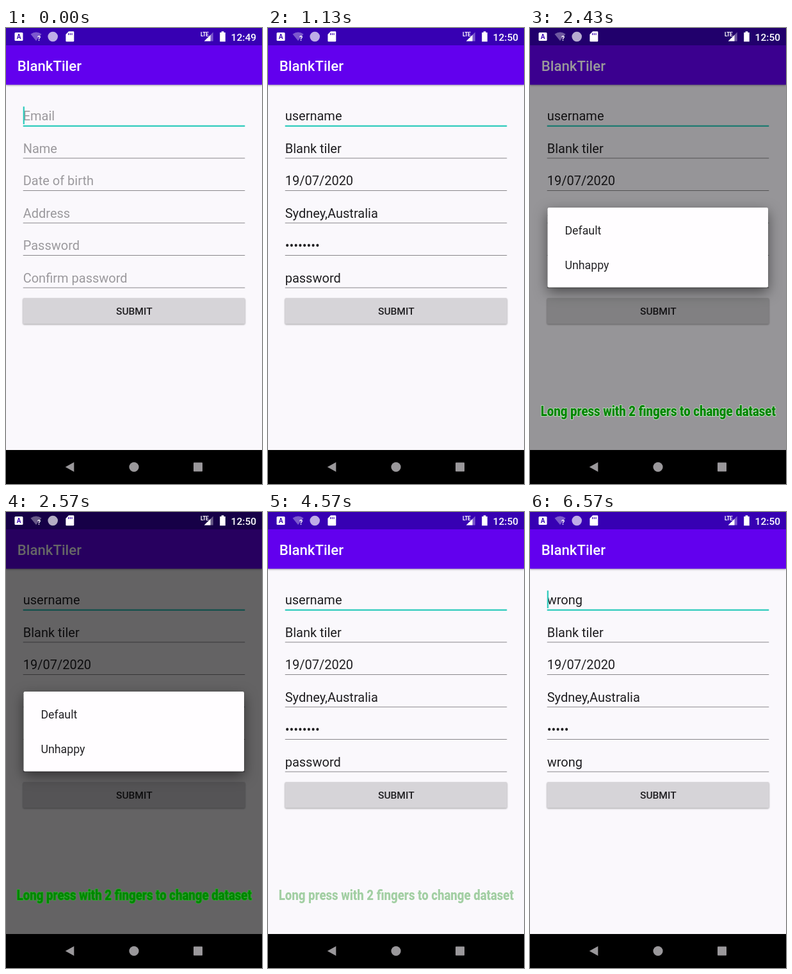
These frames come from a looping animation (400 by 711 pixels, 6.72 s). An HTML page:

```html
<!DOCTYPE html>
<html lang="en">
<head>
<meta charset="utf-8">
<title>Form demo</title>
<style>
  html, body { margin: 0; width: 100%; height: 100%; overflow: hidden; background: #000; }
  svg { display: block; width: 100vw; height: 100vh; font-family: Roboto, sans-serif; }

  .field { font-size: 20px; fill: #1f1e21; }
  .hint { fill: #9b999d; }
  .medium { font-weight: 500; }
  .item { font-size: 17.8px; fill: #242326; }
  .line { stroke: #88868a; stroke-width: 1.1; }
  .accent { fill: #2bcabb; }
  .caption {
    font-size: 22px; font-weight: 900; text-anchor: middle;
    fill: #008400; stroke: #fff; stroke-width: 1.6; paint-order: stroke;
  }

  .dialog rect { filter: drop-shadow(0 7px 10px rgba(0, 0, 0, .5)); }
  .bar { filter: drop-shadow(0 1.5px 1.5px rgba(0, 0, 0, .35)); }
  .button { filter: drop-shadow(0 1.5px 1px rgba(0, 0, 0, .35)); }

  .play { animation: 6720ms step-end infinite; }
  .empty { animation-name: empty; }
  .filled { animation-name: filled; }
  .first { animation-name: first; }
  .second { animation-name: second; }
  .cursor { animation-name: blink; }
  .dim { animation-name: dim; }
  .dialog { animation-name: dialog; }
  .caption { animation-name: caption; }

  @keyframes empty { 0% { opacity: 1 } 8.48%, 100% { opacity: 0 } }
  @keyframes filled { 0% { opacity: 0 } 8.48%, 100% { opacity: 1 } }
  @keyframes first { 0%, 72.17%, 100% { opacity: 0 } 8.48% { opacity: 1 } }
  @keyframes second { 0% { opacity: 0 } 72.17%, 100% { opacity: 1 } }
  @keyframes blink {
    0%, 4.31%, 23.36%, 29.76%, 55.2%, 63.83%, 72.17%, 89.28%, 97.76%, 100% { opacity: 1 }
    2.08%, 12.64%, 27.52%, 34.07%, 59.52%, 68%, 82.88%, 93.6% { opacity: 0 }
  }
  @keyframes dim {
    0%, 59.52%, 100% { opacity: 0 }
    36.16% { opacity: .4 }
    38.24% { opacity: .6 }
    55.2% { opacity: .02 }
  }
  @keyframes dialog { 0%, 55.2%, 100% { opacity: 0 } 36.16% { opacity: 1 } }
  @keyframes caption {
    0%, 72.17%, 100% { opacity: 0; stroke: #fff }
    27.52%, 68% { opacity: .35; stroke: #fff }
    29.76%, 63.83% { opacity: .7; stroke: #fff }
    34.07%, 55.2% { opacity: 1; stroke: #fff }
    36.16% { opacity: 1; stroke: #c4ecc4 }
    38.24% { opacity: 1; stroke: #25b525 }
  }
</style>
</head>
<body>
<svg viewBox="0 0 400 711" preserveAspectRatio="none">
  <!-- App screen -->
  <rect width="400" height="658" fill="#faf8fc"/>
  <rect class="bar" y="20" width="400" height="68.5" fill="#6200ee"/>
  <rect width="400" height="27" fill="#3700b3"/>
  <text class="medium" x="17.8" y="67" font-size="22.2" fill="#fff">BlankTiler</text>

  <g class="field hint play empty">
    <text x="26.7" y="144">Email</text>
    <text x="26.7" y="194.7">Name</text>
    <text x="26.7" y="245.2">Date of birth</text>
    <text x="26.7" y="295.8">Address</text>
    <text x="26.7" y="346.3">Password</text>
    <text x="26.7" y="397">Confirm password</text>
  </g>
  <g class="field play filled">
    <text x="26.7" y="194.7">Blank tiler</text>
    <text x="26.7" y="245.2">19/07/2020</text>
    <text x="26.7" y="295.8">Sydney,Australia</text>
  </g>
  <g class="field play first">
    <text x="26.7" y="144">username</text>
    <text x="26.7" y="346.3">••••••••</text>
    <text x="26.7" y="397">password</text>
  </g>
  <g class="field play second">
    <text x="26.7" y="144">wrong</text>
    <text x="26.7" y="346.3">•••••</text>
    <text x="26.7" y="397">wrong</text>
  </g>

  <rect class="accent" x="26.7" y="151.7" width="346.6" height="2.2"/>
  <path class="line" d="M26.7 203H373.3M26.7 253.5H373.3M26.7 304H373.3M26.7 354.5H373.3M26.7 405H373.3"/>
  <rect class="accent play cursor" x="26.7" y="122.5" width="2.2" height="27.5"/>

  <rect class="button" x="26.5" y="421" width="347" height="40.5" rx="2" fill="#d6d4d8"/>
  <text class="medium" x="200.3" y="447.2" font-size="15.55" fill="#1f1e21" text-anchor="middle">SUBMIT</text>

  <rect class="play dim" width="400" height="658"/>

  <g class="play dialog">
    <rect x="27.5" y="280" width="344.5" height="124.5" rx="2.2" fill="#fffdff"/>
    <text class="item" x="54.4" y="322.3">Default</text>
    <text class="item" x="54.4" y="375.6">Unhappy</text>
  </g>

  <!-- Narrow poster lettering -->
  <g transform="translate(200.3 605) scale(.845 1)">
    <text class="caption play">Long press with 2 fingers to change dataset</text>
  </g>

  <!-- Status icons -->
  <g fill="#fff">
    <rect x="13.5" y="7" width="13" height="13" rx="1.5"/>
    <text x="20" y="17.2" font-size="10" font-weight="700" fill="#3700b3" text-anchor="middle">A</text>
    <path d="M38.5 9.5Q47 3.5 55.5 9.5L47 20Z" opacity=".35"/>
    <text x="49" y="20" font-size="10.5" font-weight="700">?</text>
    <circle cx="73.2" cy="13.5" r="7.8" opacity=".68"/>
    <path d="M98 5.3H105Q106.3 5.3 106.3 6.6V20Q106.3 21.3 105 21.3H94.7Q93.4 21.3 93.4 20V9.9Z"/>
    <path d="M97.6 8V11M100.3 8V11M103 8V11" stroke="#3700b3" stroke-width="1.2"/>
    <text x="304" y="12.8" font-size="8.4" font-weight="700" letter-spacing="-.4">LTE</text>
    <path d="M323.7 6.5V20.5H309.7Z" opacity=".35"/>
    <path d="M319.5 10.7V20.5H309.7Z"/>
    <path d="M336.6 5.3H340.4V7H342.8V21.3H334.2V7H336.6Z"/>
    <text class="medium" y="19.6" x="351.6" font-size="15.55">
      <tspan class="play empty">12:49</tspan>
    </text>
  </g>
  <g class="play filled">
    <rect x="350" y="5" width="45" height="17" fill="#3700b3"/>
    <rect class="play dim" x="350" y="5" width="45" height="17"/>
    <text class="medium" x="351.6" y="19.6" font-size="15.55" fill="#fff">12:50</text>
  </g>

  <!-- Navigation bar -->
  <rect y="658" width="400" height="53"/>
  <g fill="#9a989b">
    <path d="M92.8 684.5L106.3 677V692Z"/>
    <circle cx="200" cy="684.5" r="7.6"/>
    <rect x="293" y="677.5" width="14" height="14" rx=".8"/>
  </g>
</svg>
</body>
</html>
```
